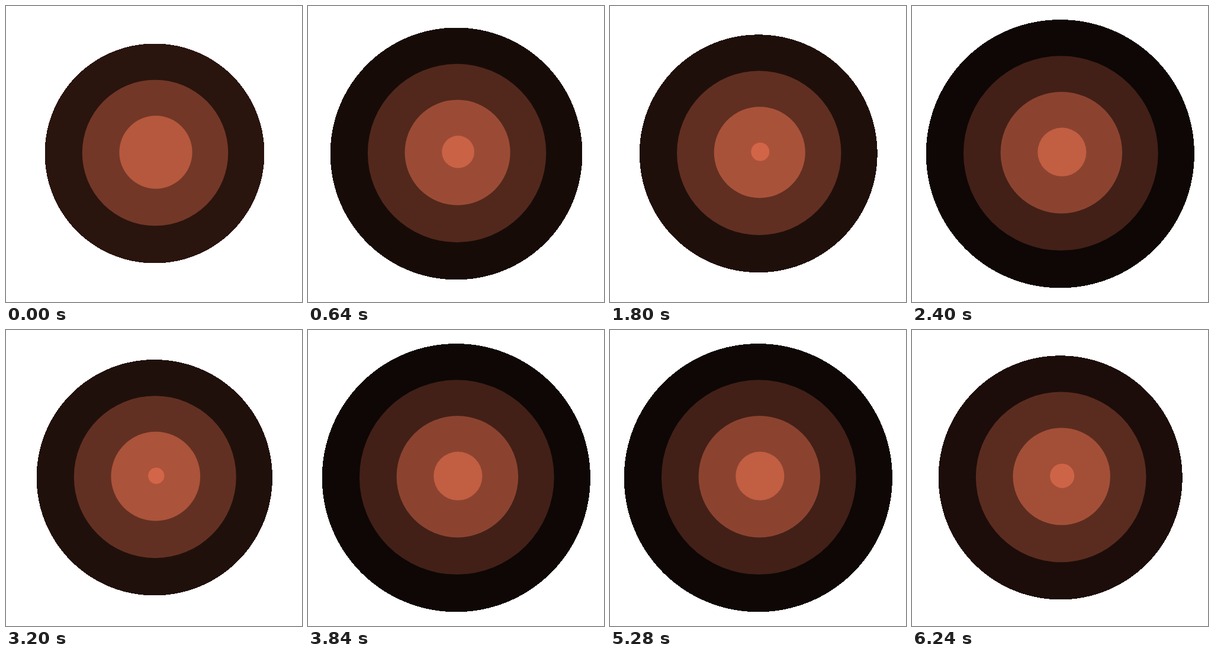
These frames come from a looping animation (500x500 px, 6.28 s). An HTML page with a canvas:

```html
<!DOCTYPE html>
<html lang="en">
<head>
<meta charset="utf-8">
<title>Growing rings</title>
<style>
  html, body { margin: 0; width: 100%; height: 100%; overflow: hidden; background: #fff; }
  canvas { display: block; width: 500px; height: 500px; }
</style>
</head>
<body>
<canvas id="stage" width="500" height="500"></canvas>
<script>
const ctx = document.getElementById('stage').getContext('2d');
const SIZE = 500;
const TICK = 40, TICKS = 157;  // the loop restarts partway through a cycle
const GAP = 36, RINGS = 4;     // ticks between rings
const GROWTH = 1.7125;         // radius per tick
const LIFE = GAP * RINGS;
const BASE = [219, 106, 75];

const mix = (a, b, f) => a + (b - a) * f;

// Brightness falls slowly at first, faster in the middle, then slowly to black
function level(age) {
  if (age < 42) return mix(1, 0.8, age / 42);
  if (age < 108) return mix(0.8, 0.19, (age - 42) / 66);
  return mix(0.19, 0, (age - 108) / (LIFE - 108));
}

const shade = age => `rgb(${BASE.map(c => Math.round(c * level(age)))})`;

function disc(x, y, r) {
  ctx.beginPath();
  ctx.arc(x, y, r, 0, Math.PI * 2);
  ctx.fill();
}

// Fills every pixel the circle touches, for an edge without smoothing
function hardDisc(x, y, r) {
  for (let row = Math.floor(y - r); row < y + r; row++) {
    const dy = Math.max(row - y, y - row - 1, 0);
    const half = Math.sqrt(Math.max(0, r * r - dy * dy));
    const left = Math.floor(x - half);
    ctx.fillRect(left, row, Math.ceil(x + half) - left, 1);
  }
}

function drawRing(age, fill) {
  const shift = age / GAP;
  ctx.fillStyle = shade(age);
  fill(254 - shift, 246 + shift, age * GROWTH);
}

const start = performance.now();

function draw(now) {
  const tick = Math.floor(Math.max(0, now - start) / TICK) % TICKS;
  ctx.fillStyle = '#fff';
  ctx.fillRect(0, 0, SIZE, SIZE);
  for (let i = RINGS - 1; i >= 0; i--) {
    drawRing(tick % GAP + i * GAP, i === RINGS - 1 ? hardDisc : disc);
  }
  requestAnimationFrame(draw);
}

draw(start);
</script>
</body>
</html>
```
